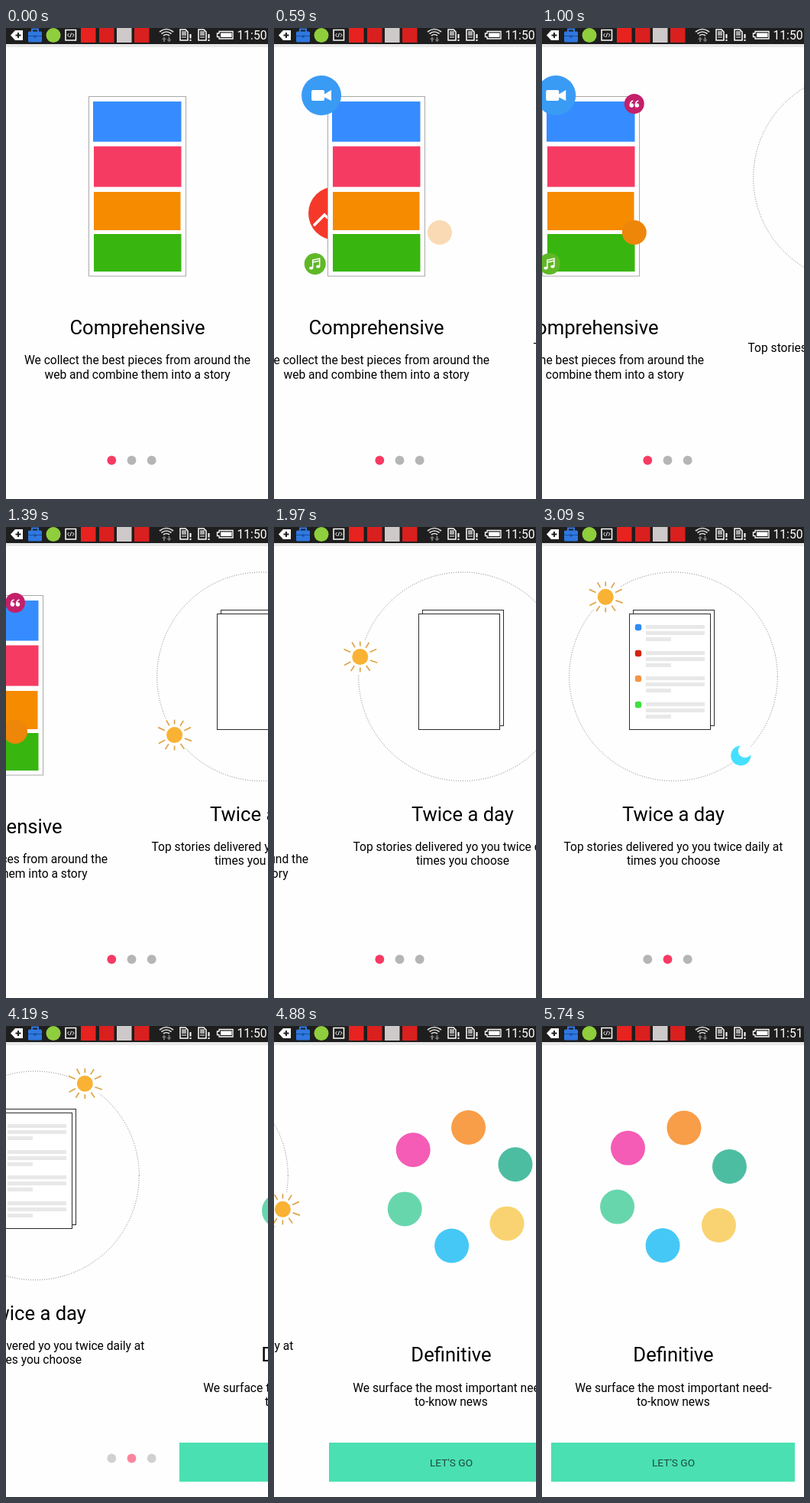
An HTML page for the animation above (5.79 s loop, 343 px wide and 615 px high).

```html
<!DOCTYPE html>
<html lang="en">
<head>
<meta charset="utf-8">
<title>Onboarding</title>
<style>
  html, body { margin: 0; width: 100%; height: 100%; overflow: hidden; background: #fefefe; }
  svg { display: block; width: 100vw; height: 100vh; }
  text { font-family: Roboto, "Noto Sans", sans-serif; text-anchor: middle; fill: #000; }
  .title { font-size: 25.6px; }
  .body { font-size: 15.6px; }
</style>
</head>
<body>
<svg viewBox="0 0 343 615">
  <rect width="343" height="615" fill="#fefefe"/>

  <g id="page0">
    <g id="behind"></g>
    <rect x="108.5" y="89.5" width="127" height="234.5" fill="#fff" stroke="#a9a9a9"/>
    <rect x="114" y="96" width="115.5" height="52.5" fill="#368cff"/>
    <rect x="115" y="154.5" width="114.5" height="53" fill="#f63b63"/>
    <rect x="115" y="214" width="113.5" height="50" fill="#f68b00"/>
    <rect x="115" y="269" width="114.5" height="49" fill="#38b60f"/>
    <g id="front"></g>
    <text class="title" x="172" y="400">Comprehensive</text>
    <text class="body" x="172" y="439">We collect the best pieces from around the</text>
    <text class="body" x="172" y="458">web and combine them into a story</text>
  </g>

  <g id="page1">
    <circle cx="172" cy="195.3" r="136.3" fill="none" stroke="#777" stroke-dasharray="1 2"/>
    <g fill="#fff" stroke="#2c2c2c">
      <rect x="119.5" y="108.5" width="106" height="151"/>
      <rect x="114.5" y="113.5" width="106" height="151"/>
    </g>
    <g id="list"></g>
    <g id="sun">
      <circle r="23" fill="#fefefe"/>
      <circle r="10.5" fill="#f9b233"/>
    </g>
    <g id="moon">
      <circle cx="-.5" cy="-.8" r="13" fill="#45e0ff"/>
      <circle cx="5" cy="-7" r="9" fill="#fefefe"/>
    </g>
    <text class="title" x="172" y="383.5">Twice a day</text>
    <text class="body" x="172" y="422.7">Top stories delivered yo you twice daily at</text>
    <text class="body" x="172" y="441">times you choose</text>
  </g>

  <g id="dots"></g>

  <g id="page2">
    <g id="ring"></g>
    <text class="title" x="172" y="438">Definitive</text>
    <text class="body" x="172" y="477.5">We surface the most important need-</text>
    <text class="body" x="172" y="496">to-know news</text>
    <rect x="12" y="544" width="319" height="51" fill="#4ae0b2"/>
    <text x="172" y="574.7" font-size="13.7" style="fill:#1d4a3c">LET'S GO</text>
  </g>

  <g id="statusBar">
    <rect y="21" width="343" height="4" fill="#e9e9e9"/>
    <rect width="343" height="21" fill="#1e1e1e"/>
    <path d="M6 9.500L12 3H22V16H12Z" fill="#fff"/>
    <path d="M12.500 9.500H19.500M16 6V13" stroke="#1e1e1e" stroke-width="2"/>
    <path d="M34 5V1.500H42V5" fill="none" stroke="#2f78e0" stroke-width="2"/>
    <rect x="29" y="4.500" width="18" height="14" rx="1.500" fill="#2f78e0"/>
    <path d="M29 10.500H47" stroke="#174f9e"/>
    <rect x="36.500" y="9.500" width="3" height="3" fill="#174f9e"/>
    <circle cx="62" cy="9.500" r="9.500" fill="#8fce3c"/>
    <rect x="78" y="2.500" width="13.500" height="13.500" fill="none" stroke="#fff" stroke-width="1.500"/>
    <path d="M82.500 7L80.500 9.300L82.500 11.600M87 7L89 9.300L87 11.600M85.700 6.500L83.800 12" fill="none" stroke="#fff"/>
    <rect x="98" width="19.500" height="19" fill="#e8221f"/>
    <rect x="122" width="19.500" height="19" fill="#d9201e"/>
    <rect x="145" width="19.500" height="19" fill="#cfcaca"/>
    <rect x="168" width="19.500" height="19" fill="#d9201e"/>
    <path d="M201 5Q210 -2 219 5M203.500 7.500Q210 2.500 216.500 7.500M206 10Q210 7 214 10"
          fill="none" stroke="#ddd" stroke-width="1.700"/>
    <path d="M204 15L207 11.500L210 15H208V18H206V15ZM210.500 15L213.500 18.500L216.500 15H214.500V12H212.500V15Z" fill="#777"/>
    <g id="sims"></g>
    <path d="M279 4.500H297V14H279V11.500H276.500V7H279Z" fill="none" stroke="#fff" stroke-width="1.300"/>
    <rect x="281" y="6.500" width="14.500" height="5.500" fill="#fff"/>
    <text id="clock" x="322" y="15" font-size="15.700" style="fill:#fff">11:50</text>
  </g>
</svg>

<script>
const LOOP = 5790, PITCH = 349.5;
const NS = "http://www.w3.org/2000/svg";
const $ = id => document.getElementById(id);
const clamp = v => Math.max(0, Math.min(1, v));
const rad = deg => deg * Math.PI / 180;
const moveTo = (el, x, y) => el.setAttribute("transform", `translate(${x.toFixed(2)} ${y.toFixed(2)})`);

function add(parent, tag, attrs) {
  const el = document.createElementNS(NS, tag);
  for (const key in attrs) el.setAttribute(key, attrs[key]);
  return parent.appendChild(el);
}

// Scroll position in pages over time, joined by a monotone cubic
const scrollKeys = [[0, 0], [590, .109], [1390, .536], [1970, .785], [2400, 1],
                    [3600, 1], [4190, 1.383], [5400, 2], [LOOP, 2]];
const slopes = scrollKeys.slice(1).map(([t, p], i) => (p - scrollKeys[i][1]) / (t - scrollKeys[i][0]));
const tangents = scrollKeys.map((_, i) => {
  const a = slopes[i - 1], b = slopes[i];
  return a && b ? 2 * a * b / (a + b) : 0;
});

function scrollAt(t) {
  let i = 0;
  while (i < scrollKeys.length - 2 && t >= scrollKeys[i + 1][0]) i++;
  const [t0, p0] = scrollKeys[i], [t1, p1] = scrollKeys[i + 1];
  const span = t1 - t0, u = (t - t0) / span, v = 1 - u;
  return p0 * (1 + 2 * u) * v * v + p1 * u * u * (3 - 2 * u)
       + span * u * v * (tangents[i] * v - tangents[i + 1] * u);
}

// Badges drift towards the card: x and y at scroll .109, direction, scroll where the fade begins
const badges = [
  { layer: "behind", x: 118, y: 242, r: 35, dir: 1, from: .01, color: "#f4392b",
    art: '<path d="M-27 15L-14 2L-4 11" fill="none" stroke="#fff" stroke-width="3.5" stroke-linecap="round"/>' },
  { layer: "front", x: 100, y: 88, r: 26, dir: 1, from: .01, color: "#3a9bf5",
    art: '<rect x="-13" y="-7" width="17" height="14" rx="2" fill="#fff"/><path d="M3 -1L13 -7V7L3 2Z" fill="#fff"/>' },
  { layer: "front", x: 91.7, y: 308, r: 14, dir: 1, from: .025, color: "#60b827",
    art: '<path d="M-3 5V-5L6 -7V3M-3 -2L6 -4" fill="none" stroke="#fff" stroke-width="1.5"/>' +
         '<ellipse cx="-5" cy="5.5" rx="2.6" ry="2" fill="#fff"/><ellipse cx="4" cy="3.5" rx="2.6" ry="2" fill="#fff"/>' },
  { layer: "front", x: 255, y: 267, r: 16, dir: -1, from: .085, color: "#ee8609", art: "" },
  { layer: "front", x: 255, y: 99, r: 13, dir: -1, from: .12, color: "#c4206a",
    art: [-3.5, 3.5].map(x => `<circle cx="${x}" cy="2" r="2.7" fill="#fff"/>` +
         `<path d="M${x - 2} 2Q${x - 2} -3 ${x + 2} -4" fill="none" stroke="#fff" stroke-width="1.5"/>`).join("") },
];
for (const b of badges) {
  b.el = add($(b.layer), "g", {});
  add(b.el, "circle", { r: b.r, fill: b.color });
  b.el.insertAdjacentHTML("beforeend", b.art);
}

const rows = ["#2f8cf5", "#d42512", "#f0964a", "#40df40"].map((fill, i) => {
  const y = Math.round(131 + i * 33.6);
  return {
    y,
    dot: add($("list"), "rect", { x: -4.2, y: -4.2, width: 8.4, height: 8.4, rx: 3, fill }),
    lines: [77, 77, 33].map((full, k) => ({
      full, el: add($("list"), "rect", { x: 136, y: y - 3 + k * 8, width: 0, height: 5, fill: "#e8e8e8" })
    }))
  };
});

// Slightly uneven rays, as if drawn by hand
for (const deg of [-90, -58, -25, 19, 55, 90, 123, 152, 205, 241]) {
  const c = Math.cos(rad(deg)), s = Math.sin(rad(deg));
  const outer = 20 + 4 * Math.abs(c);
  add($("sun"), "line", { x1: c * 14, y1: s * 14, x2: c * outer, y2: s * outer, stroke: "#dda448", "stroke-width": 1.7 });
}

const ring = ["#f89d48", "#4dbda2", "#f9d371", "#46c8f7", "#68d6ad", "#f45cb6"]
  .map(fill => add($("ring"), "circle", { r: 22.5, fill }));
const dots = [138.3, 164.5, 190.7].map(cx => add($("dots"), "circle", { cx, cy: 564.5, r: 5.9 }));

for (const x of [228, 252]) {
  add($("sims"), "path", { d: `M${x} 2H${x + 7}L${x + 10} 5V16H${x}Z`, fill: "none", stroke: "#fff", "stroke-width": 1.5 });
  add($("sims"), "path", { d: `M${x + 3} 4V10M${x + 5} 4V10M${x + 7} 4V10M${x + 2} 12H${x + 8}`, stroke: "#fff", "stroke-width": 1.2 });
  add($("sims"), "path", { d: `M${x + 13.5} 8V13.500M${x + 13.5} 15V17`, stroke: "#fff", "stroke-width": 2 });
}

function orbit(el, deg) {
  moveTo(el, 172 + 136.7 * Math.cos(rad(deg)), 195.3 + 136.7 * Math.sin(rad(deg)));
}

function render(t) {
  const p = scrollAt(t);
  for (let i = 0; i < 3; i++) moveTo($("page" + i), Math.round((i - p) * PITCH), 0);

  for (const b of badges) {
    moveTo(b.el, b.x + b.dir * 131 * (p - .109), b.y);
    b.el.setAttribute("opacity", clamp((p - b.from) / .08));
  }

  const sunAngle = 229.5 + 180 * (p - 1);
  orbit($("sun"), sunAngle);
  orbit($("moon"), sunAngle + 180);

  rows.forEach((row, i) => {
    const age = t - 2420 - i * 130;
    row.dot.setAttribute("transform", `translate(126 ${row.y}) scale(${clamp(age / 110)})`);
    for (const line of row.lines) line.el.setAttribute("width", line.full * clamp((age - 40) / 230));
  });

  const shift = 68 * (2 - p), turn = -4 * (5740 - t) / 1550;
  ring.forEach((c, i) => {
    const a = rad(-79.7 + 60 * i + turn);
    moveTo(c, 172 + shift + 78 * Math.cos(a), 209.8 + 78 * Math.sin(a));
  });

  const active = t < 2300 ? 0 : 1;
  dots.forEach((d, i) => d.setAttribute("fill", i === active ? "#f63b63" : "#b5b5b5"));
  $("dots").setAttribute("opacity", clamp(2 - p));
  $("clock").textContent = t < 5100 ? "11:50" : "11:51";
}

const start = performance.now();
function tick() {
  render((performance.now() - start) % LOOP);
  requestAnimationFrame(tick);
}
tick();
</script>
</body>
</html>
```
